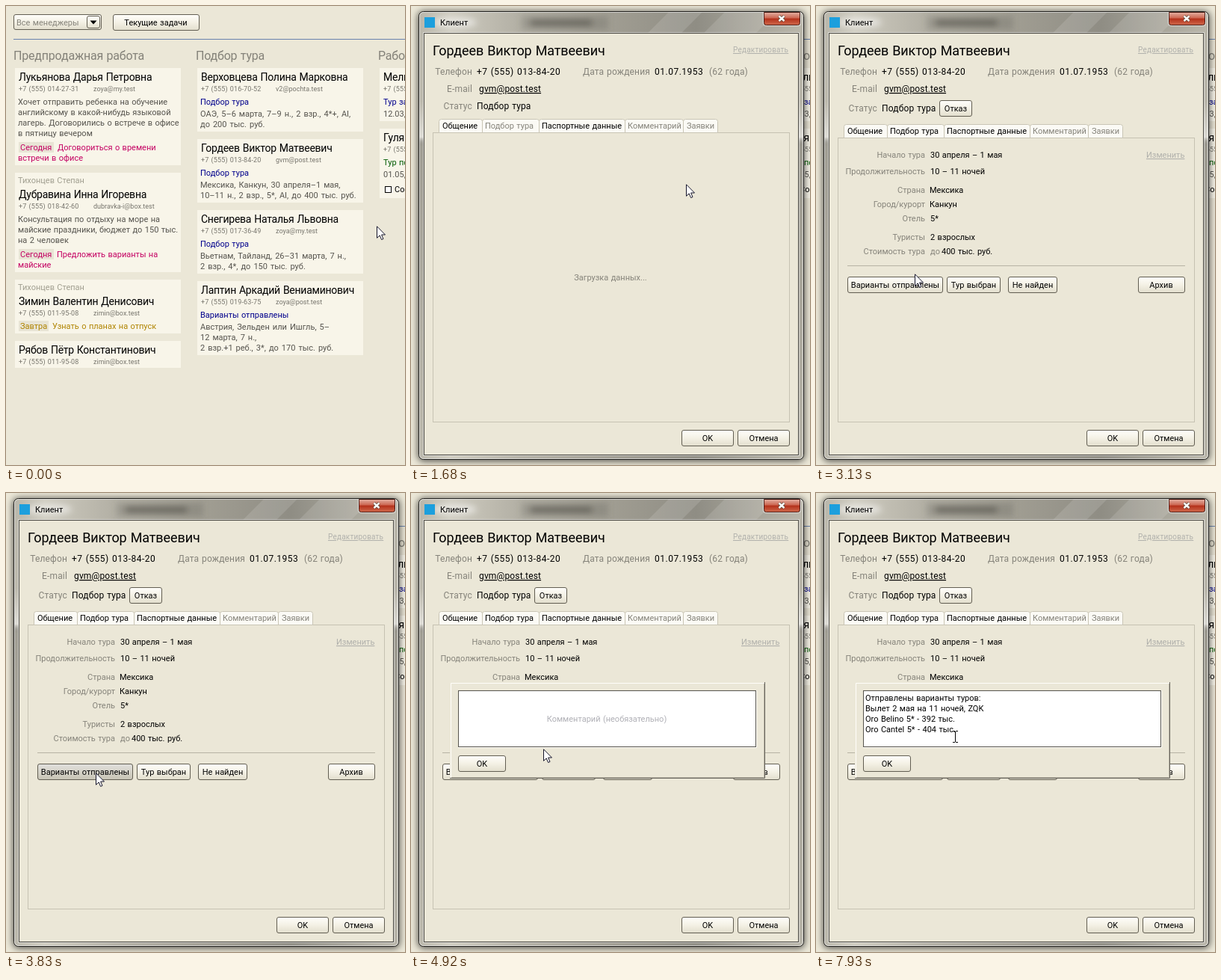
An HTML page that plays this animation: 534x614 px, repeating every 8000 ms.

```html
<!DOCTYPE html>
<html lang="ru">
<head>
<meta charset="utf-8">
<title>Карточка клиента</title>
<style>
html, body { margin: 0; width: 534px; height: 614px; overflow: hidden; background: #ebe7d7; }
svg { display: block; }
text { font: 11px Roboto, "Noto Sans", sans-serif; word-spacing: .7px; fill: #000; white-space: pre; }
.head { font-size: 16px; letter-spacing: -.2px; fill: #848279; }
.name { font-size: 14px; letter-spacing: -.25px; }
.phone { font-size: 9px; letter-spacing: .15px; fill: #77756d; }
.mail { font-size: 9px; fill: #77756d; }
.body { fill: #55534d; }
.tour { fill: #55534d; word-spacing: 1.3px; }
.stage { fill: #00008c; }
.owner { fill: #a19f90; }
.today { fill: #c40062; }
.soon { fill: #b08400; }
.sold { fill: #005a00; }
.dim { fill: #85837a; }
.mid { font-size: 12px; letter-spacing: .15px; }
.num { letter-spacing: .5px; }
.r { text-anchor: end; }
.c { text-anchor: middle; }
.link { fill: #b1b1ac; text-decoration: underline; }
.card { fill: #f8f5e9; }
.tag { fill: #e8e4d5; }
.btn { fill: url(#face); stroke: #625e52; }
.tab { fill: #fbfaf5; stroke: #c9c5b5; }
.panel { fill: none; stroke: #c6c2b2; }
.t { animation: 8s step-end infinite; }

#pointer { animation-name: path; }
#arrow { animation-name: arrow; }
#hand { animation-name: hand; }
#beam { animation-name: beam; }
#dialog { animation-name: dialog; }
#loading { animation-name: loading; }
#loaded { animation-name: loaded; }
#hover { animation-name: hover; }
#press { animation-name: press; }
#popup { animation-name: popup; }
#okHover { animation-name: okHover; }
#hint { animation-name: hint; }
#note { animation-name: note; }
#caretStart { animation-name: caretStart; }
#caretEnd { animation-name: caretEnd; }

@keyframes path {
  0% { transform: translate(496px, 294px); }
  5.5% { transform: translate(486px, 289px); }
  7.25% { transform: translate(452px, 271px); }
  8.75% { transform: translate(417px, 255px); }
  10.625% { transform: translate(395px, 247px); }
  12.125% { transform: translate(380px, 241px); }
  13.625% { transform: translate(372px, 239px); }
  15.25% { transform: translate(369px, 238px); }
  17.125% { transform: translate(368px, 238px); }
  32.125% { transform: translate(335px, 248px); }
  33.75% { transform: translate(280px, 260px); }
  35.625% { transform: translate(190px, 295px); }
  37.625% { transform: translate(152px, 328px); }
  39.125% { transform: translate(132px, 358px); }
  40.875% { transform: translate(122px, 371px); }
  42.5% { transform: translate(120px, 374px); }
  51.25% { transform: translate(120px, 373px); }
  54.75% { transform: translate(124px, 368px); }
  56.25% { transform: translate(146px, 356px); }
  57.875% { transform: translate(167px, 346px); }
  59.75% { transform: translate(173px, 348px); }
  61.5% { transform: translate(177px, 342px); }
  63.125% { transform: translate(185px, 334px); }
  64.625% { transform: translate(185px, 332px); }
  79.25% { transform: translate(185px, 331px); }
  91.125% { transform: translate(185px, 330px); }
  92.875% { transform: translate(185px, 328px); }
  96%, 100% { transform: translate(186px, 326px); }
}
@keyframes arrow { 0% { opacity: 1; } 8.75% { opacity: 0; } 21% { opacity: 1; } 63.125%, 100% { opacity: 0; } }
@keyframes hand { 0% { opacity: 0; } 8.75% { opacity: 1; } 21%, 100% { opacity: 0; } }
@keyframes beam { 0% { opacity: 0; } 63.125%, 100% { opacity: 1; } }
@keyframes dialog { 0% { opacity: 0; } 21%, 100% { opacity: 1; } }
@keyframes loading { 0% { opacity: 1; } 22.875%, 100% { opacity: 0; } }
@keyframes loaded { 0% { opacity: 0; } 22.875%, 100% { opacity: 1; } }
@keyframes hover { 0% { opacity: 0; } 40.875% { opacity: .5; } 47.875%, 100% { opacity: 0; } }
@keyframes press { 0% { opacity: 0; } 47.875% { opacity: .12; } 49.5%, 100% { opacity: 0; } }
@keyframes popup { 0% { opacity: 0; } 49.5%, 100% { opacity: 1; } }
@keyframes okHover { 0% { opacity: 0; } 54.75% { opacity: .5; } 56.25%, 100% { opacity: 0; } }
@keyframes hint { 0% { opacity: 1; } 81.125%, 100% { opacity: 0; } }
@keyframes note { 0% { opacity: 0; } 81.125%, 100% { opacity: 1; } }
@keyframes caretStart {
  0%, 56.25%, 68.375%, 81.125%, 100% { opacity: 0; }
  49.5%, 63.125%, 73.75% { opacity: 1; }
}
@keyframes caretEnd {
  0%, 86.375%, 99.125%, 100% { opacity: 0; }
  81.125%, 92.875% { opacity: 1; }
}
</style>
</head>
<body>
<svg width="534" height="614" viewBox="0 0 534 614">
<defs>
  <linearGradient id="face" x2="0" y2="1"><stop stop-color="#fffefb"/><stop offset=".5" stop-color="#f4f1e5"/><stop offset="1" stop-color="#e2decd"/></linearGradient>
  <linearGradient id="glass"><stop stop-color="#b9b6aa"/><stop offset=".08" stop-color="#cecbbf"/><stop offset=".26" stop-color="#b3b0a5"/><stop offset=".5" stop-color="#a09d92"/><stop offset=".72" stop-color="#8f8d84"/><stop offset="1" stop-color="#bab7ab"/></linearGradient>
  <linearGradient id="shade" x2="0" y2="1"><stop offset=".2" stop-color="#fff" stop-opacity="0"/><stop offset=".28" stop-color="#fff" stop-opacity=".5"/><stop offset=".3" stop-opacity=".15"/><stop offset="1" stop-opacity="0"/></linearGradient>
  <linearGradient id="red" x2="0" y2="1"><stop stop-color="#e3b0a2"/><stop offset=".45" stop-color="#cc6550"/><stop offset=".5" stop-color="#b3301a"/><stop offset="1" stop-color="#d0694c"/></linearGradient>
  <filter id="blur" x="-50%" y="-100%" width="200%" height="300%"><feGaussianBlur stdDeviation="4"/></filter>
  <filter id="shadow" x="-10%" y="-10%" width="120%" height="120%"><feGaussianBlur stdDeviation="5"/></filter>
  <g id="tabs">
    <path class="tab" d="M37.500 176.500v-15q0-3 3-3h52q3 0 3 3v15zM95.500 176.500v-15q0-3 3-3h70q3 0 3 3v15zM171.500 176.500v-15q0-3 3-3h109q3 0 3 3v15zM286.500 176.500v-15q0-3 3-3h72q3 0 3 3v15zM364.500 176.500v-15q0-3 3-3h40q3 0 3 3v15z"/>
    <text x="42" y="171">Общение</text>
    <text x="175" y="171">Паспортные данные</text>
    <text class="dim" x="290" y="171">Комментарий</text>
    <text class="dim" x="369" y="171">Заявки</text>
  </g>
</defs>

<g id="board">
  <rect width="534" height="614" fill="#ebe7d7"/>
  <rect class="btn" x="10.500" y="11.500" width="117" height="20" rx="2.500"/>
  <text class="dim" x="14" y="26">Все менеджеры</text>
  <rect class="btn" x="108.500" y="13.500" width="17" height="16" rx="2.500"/>
  <path d="M112.500 19.500h9l-4.500 5z"/>
  <rect class="btn" x="143.500" y="11.500" width="115" height="21" rx="2.500"/>
  <text class="c" x="200.500" y="26">Текущие задачи</text>
  <path d="M10 44.500H534" stroke="#6982ad"/>

  <text class="head" x="10" y="72">Предпродажная работа</text>
  <path class="card" d="M12 83h222v130H12zM12 223h222v133H12zM12 366h222v72H12zM12 448h222v36H12z"/>
  <path class="tag" d="M17 182h47v14H17zM17 325h47v14H17zM17 421h40v14H17z"/>
  <text class="name" x="17" y="100">Лукьянова Дарья Петровна</text>
  <text class="phone" x="17" y="114">+7 (555) 014-27-31</text>
  <text class="mail" x="117" y="114">zoya@my.test</text>
  <text class="body" x="16" y="132">Хочет отправить ребенка на обучение</text>
  <text class="body" x="16" y="146">английскому в какой-нибудь языковой</text>
  <text class="body" x="16" y="160">лагерь. Договорились о встрече в офисе</text>
  <text class="body" x="16" y="174">в пятницу вечером</text>
  <text class="today" x="19" y="193">Сегодня</text>
  <text class="today" x="69" y="193">Договориться о времени</text>
  <text class="today" x="16" y="207">встречи в офисе</text>

  <text class="owner" x="16" y="237">Тихонцев Степан</text>
  <text class="name" x="17" y="257">Дубравина Инна Игоревна</text>
  <text class="phone" x="17" y="271">+7 (555) 018-42-60</text>
  <text class="mail" x="117" y="271">dubravka-i@box.test</text>
  <text class="body" x="16" y="289">Консультация по отдыху на море на</text>
  <text class="body" x="16" y="303">майские праздники, бюджет до 150 тыс.</text>
  <text class="body" x="16" y="317">на 2 человек</text>
  <text class="today" x="19" y="336">Сегодня</text>
  <text class="today" x="68" y="336">Предложить варианты на</text>
  <text class="today" x="16" y="350">майские</text>

  <text class="owner" x="16" y="380">Тихонцев Степан</text>
  <text class="name" x="17" y="400">Зимин Валентин Денисович</text>
  <text class="phone" x="17" y="414">+7 (555) 011-95-08</text>
  <text class="mail" x="117" y="414">zimin@box.test</text>
  <text class="soon" x="19" y="432">Завтра</text>
  <text class="soon" x="62" y="432">Узнать о планах на отпуск</text>
  <text class="name" x="17" y="465">Рябов Пётр Константинович</text>
  <text class="phone" x="17" y="479">+7 (555) 011-95-08</text>
  <text class="mail" x="117" y="479">zimin@box.test</text>

  <text class="head" x="254" y="72">Подбор тура</text>
  <path class="card" d="M256 83h222v85H256zM256 178h222v85H256zM256 273h222v85H256zM256 368h222v99H256z"/>
  <text class="name" x="261" y="100">Верховцева Полина Марковна</text>
  <text class="phone" x="261" y="114">+7 (555) 016-70-52</text>
  <text class="mail" x="361" y="114">v2@pochta.test</text>
  <text class="stage" x="260" y="132">Подбор тура</text>
  <text class="tour" x="260" y="148">ОАЭ, 5–6 марта, 7–9 н., 2 взр., 4*+, AI,</text>
  <text class="tour" x="260" y="162">до 200 тыс. руб.</text>

  <text class="name" x="261" y="195">Гордеев Виктор Матвеевич</text>
  <text class="phone" x="261" y="209">+7 (555) 013-84-20</text>
  <text class="mail" x="361" y="209">gvm@post.test</text>
  <text class="stage" x="260" y="227">Подбор тура</text>
  <text class="tour" x="260" y="243">Мексика, Канкун, 30 апреля–1 мая,</text>
  <text class="tour" x="260" y="257">10–11 н., 2 взр., 5*, AI, до 400 тыс. руб.</text>

  <text class="name" x="261" y="290">Снегирева Наталья Львовна</text>
  <text class="phone" x="261" y="304">+7 (555) 017-36-49</text>
  <text class="mail" x="361" y="304">zoya@my.test</text>
  <text class="stage" x="260" y="322">Подбор тура</text>
  <text class="tour" x="260" y="338">Вьетнам, Тайланд, 26–31 марта, 7 н.,</text>
  <text class="tour" x="260" y="352">2 взр., 4*, до 150 тыс. руб.</text>

  <text class="name" x="261" y="385">Лаптин Аркадий Вениаминович</text>
  <text class="phone" x="261" y="399">+7 (555) 019-63-75</text>
  <text class="mail" x="361" y="399">zoya@post.test</text>
  <text class="stage" x="260" y="417">Варианты отправлены</text>
  <text class="tour" x="260" y="433">Австрия, Зельден или Ишгль, 5–</text>
  <text class="tour" x="260" y="447">12 марта, 7 н.,</text>
  <text class="tour" x="260" y="461">2 взр.+1 реб., 3*, до 170 тыс. руб.</text>

  <text class="head" x="498" y="72">Работа</text>
  <path class="card" d="M500 83h34v71h-34zM500 164h34v93h-34z"/>
  <text class="name" x="505" y="100">Мельн</text>
  <text class="phone" x="505" y="114">+7 (555)</text>
  <text class="stage" x="505" y="132">Тур заб</text>
  <text class="body" x="505" y="148">12.03,</text>
  <text class="name" x="505" y="181">Гуляк</text>
  <text class="phone" x="505" y="195">+7 (555)</text>
  <text class="sold" x="505" y="213">Тур под</text>
  <text class="body" x="505" y="229">01.05,</text>
  <rect x="507.500" y="241.500" width="8" height="8" fill="#fff" stroke="#000"/>
  <text x="520" y="249">Сост</text>
</g>

<g id="dialog" class="t">
  <rect x="9" y="7" width="518" height="602" rx="8" filter="url(#shadow)" opacity=".65"/>
  <rect x="10.500" y="7.500" width="515" height="599" rx="6" fill="url(#glass)"/>
  <path d="M345 8h45l-28 28h-45zM420 8h70l-28 28h-70z" fill="#fff" opacity=".12"/>
  <rect x="10.500" y="7.500" width="515" height="599" rx="6" fill="url(#shade)" stroke="#22211e"/>
  <rect x="11.500" y="8.500" width="513" height="597" rx="5" fill="none" stroke="#fff" opacity=".6"/>
  <g filter="url(#blur)">
    <ellipse cx="58" cy="22" rx="30" ry="7" fill="#fff" opacity=".55"/>
    <rect x="148" y="13" width="116" height="19" fill="#5a5850" opacity=".25"/>
    <rect x="160" y="19" width="82" height="7" fill="#47453f" opacity=".6"/>
  </g>
  <rect x="18" y="15" width="14" height="14" fill="#1c9fdd"/>
  <text x="39" y="26">Клиент</text>
  <path d="M471.500 8.500v15q0 3 3 3h44q3 0 3-3v-15" fill="none" stroke="#fff" opacity=".6"/>
  <path d="M472.500 8.500h48v14q0 3-3 3h-42q-3 0-3-3z" fill="url(#red)" stroke="#4d1f18"/>
  <g id="cross" fill="none">
    <path d="M492.500 13.500l7 6.500m0-6.500l-7 6.500" stroke="#543" stroke-width="4"/>
    <path d="M492.500 13.500l7 6.500m0-6.500l-7 6.500" stroke="#fff" stroke-width="2.400"/>
  </g>
  <rect x="16.500" y="35.500" width="503" height="566" fill="none" stroke="#fff" opacity=".5"/>
  <rect x="17.500" y="36.500" width="501" height="564" fill="#ebe7d7" stroke="#4b4943"/>

  <text x="29" y="66" style="font-size:18px;letter-spacing:-.1px">Гордеев Виктор Матвеевич</text>
  <text class="link" x="431" y="62" style="font-size:10px;letter-spacing:.2px">Редактировать</text>
  <text class="mid dim r" x="82" y="92">Телефон</text>
  <text class="mid num" x="88" y="92">+7 (555) 013-84-20</text>
  <text class="mid dim r" x="320" y="92">Дата рождения</text>
  <text class="mid num" x="326" y="92">01.07.1953</text>
  <text class="mid dim" x="399" y="92">(62 года)</text>
  <text class="mid dim r" x="82" y="115">E-mail</text>
  <text class="mid" x="91" y="115" text-decoration="underline">gvm@post.test</text>

  <g id="loading" class="t">
    <text class="mid dim r" x="82" y="138">Статус</text>
    <text class="mid" x="88" y="138">Подбор тура</text>
    <rect class="panel" x="29.500" y="169.500" width="477" height="387"/>
    <use href="#tabs" y="-7"/>
    <text class="dim" x="99" y="164">Подбор тура</text>
    <text class="dim c" x="267" y="367">Загрузка данных...</text>
  </g>

  <g id="loaded" class="t">
    <text class="mid dim r" x="82" y="141">Статус</text>
    <text class="mid" x="88" y="141">Подбор тура</text>
    <rect class="btn" x="165.500" y="126.500" width="43" height="21" rx="2.500"/>
    <text class="c" x="187" y="141">Отказ</text>
    <rect class="panel" x="29.500" y="176.500" width="477" height="380"/>
    <use href="#tabs"/>
    <text x="99" y="171">Подбор тура</text>

    <text class="dim r" x="146" y="203">Начало тура</text>
    <text x="153" y="203">30 апреля – 1 мая</text>
    <text class="link" x="442" y="203">Изменить</text>
    <text class="dim r" x="146" y="225">Продолжительность</text>
    <text x="153" y="225">10 – 11 ночей</text>
    <text class="dim r" x="146" y="250">Страна</text>
    <text x="152" y="250">Мексика</text>
    <text class="dim r" x="146" y="269">Город/курорт</text>
    <text x="152" y="269">Канкун</text>
    <text class="dim r" x="146" y="288">Отель</text>
    <text x="153" y="288">5*</text>
    <text class="dim r" x="146" y="313">Туристы</text>
    <text x="153" y="313">2 взрослых</text>
    <text class="dim r" x="146" y="332">Стоимость тура</text>
    <text class="dim" x="153" y="332">до</text>
    <text x="168" y="332">400 тыс. руб.</text>
    <path d="M42 347.500H494" stroke="#b7b3a4"/>
    <rect class="btn" x="42.500" y="362.500" width="127" height="21" rx="2.500"/>
    <rect id="hover" class="t" x="43" y="363" width="126" height="20" fill="#fff"/>
    <rect id="press" class="t" x="43" y="363" width="126" height="20"/>
    <text class="c" x="106" y="377">Варианты отправлены</text>
    <rect class="btn" x="175.500" y="362.500" width="71" height="21" rx="2.500"/>
    <text class="c" x="211" y="377">Тур выбран</text>
    <rect class="btn" x="257.500" y="362.500" width="65" height="21" rx="2.500"/>
    <text class="c" x="290" y="377">Не найден</text>
    <rect class="btn" x="431.500" y="362.500" width="62" height="21" rx="2.500"/>
    <text class="c" x="462" y="377">Архив</text>
  </g>

  <rect class="btn" x="362.500" y="567.500" width="69" height="21" rx="2.500"/>
  <text class="c" x="397" y="582">OK</text>
  <rect class="btn" x="437.500" y="567.500" width="69" height="21" rx="2.500"/>
  <text class="c" x="472" y="582">Отмена</text>
</g>

<g id="popup" class="t">
  <rect x="52" y="253" width="422" height="129" fill="#ebe7d7"/>
  <path d="M53.500 381V254.500H473" fill="none" stroke="#fffefa"/>
  <path d="M52 381.500H473.500V253" fill="none" stroke="#65625a"/>
  <path d="M54 380.500H472.500V255" fill="none" stroke="#b9b5a6"/>
  <rect x="63.500" y="264.500" width="398" height="75" fill="#fff" stroke="#57554e"/>
  <path d="M63 340.500H462.500V264" fill="none" stroke="#fffefa"/>
  <text id="hint" class="t c" x="262" y="306" style="fill:#b0b0b6">Комментарий (необязательно)</text>
  <g id="note" class="t">
    <text x="66" y="278">Отправлены варианты туров:</text>
    <text x="66" y="292">Вылет 2 мая на 11 ночей, ZQK</text>
    <text x="66" y="306">Oro Belino 5* - 392 тыс.</text>
    <text x="66" y="320">Oro Cantel 5* - 404 тыс.</text>
  </g>
  <rect id="caretStart" class="t" x="67" y="267" width="1" height="14"/>
  <rect id="caretEnd" class="t" x="190" y="309" width="1" height="14"/>
  <rect class="btn" x="63.500" y="351.500" width="63" height="21" rx="2.500"/>
  <rect id="okHover" class="t" x="64" y="352" width="62" height="20" fill="#fff"/>
  <text class="c" x="95" y="366">OK</text>
</g>

<g id="pointer" class="t">
  <path id="arrow" class="t" d="M.5.8V16.300L4.200 12.900 6.600 18.500 9 17.500 6.600 12H11.500z" fill="#fff" stroke="#15152a"/>
  <g id="hand" class="t" fill="#fff" stroke="#000" stroke-linejoin="round">
    <path d="M.5 2Q.5.500 2 .5T3.500 2V7.500Q3.500 6 5 6T6.500 7.500V8Q6.500 7 8 7T9.500 8.500V9Q9.500 8 10.500 8T11.500 10V15Q11.500 17 10 18.500V21.500H1V19L-4 13Q-5 11.500-4 10.500T-1.500 11L.5 13z"/>
    <path d="M3.500 7.500v4M6.500 8v4M9.500 9v3" fill="none"/>
  </g>
  <path id="beam" class="t" d="M-3 -7.500h3M1 -7.500h3M.5 -7v14M-3 7.500h3M1 7.500h3" stroke="#000"/>
</g>
</svg>
</body>
</html>
```
